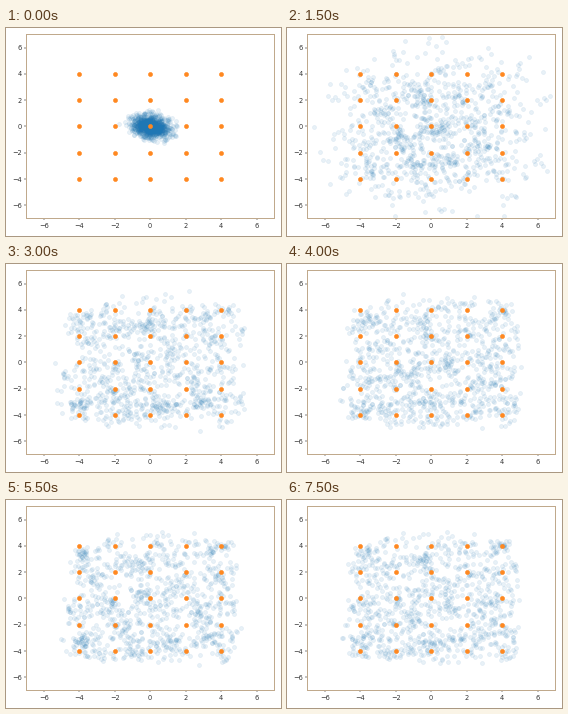
A matplotlib script that plays this animation: 275x208 px, repeating every 8 s.

```python
import numpy as np
import matplotlib.pyplot as plt
from matplotlib.animation import FuncAnimation

W, H, DPI = 275, 208, 43
FRAMES, STEP = 16, 500
N = 1000
LEFT, RIGHT, TOP, BOTTOM = 20, 268.45, 6.45, 190.45

rng = np.random.default_rng(7)
Z = rng.standard_normal((N, 2))
JITTER = rng.standard_normal((N, 2))

# Corners where points pile up late in training: centre, pull
CORNERS = [((-3.8, 3.2), 0.6), ((4.0, 3.9), 0.45), ((-4.2, -4.0), 0.4)]


def samples(k):
    """Generated points at training stage k."""
    if k == 0:
        x = 0.54 * Z[:, 0]
        return np.column_stack([x, 0.05 + 0.42 * Z[:, 1] - 0.2 * x])

    # A wide normal cloud settles into a square
    square = 0.95 * (1 - np.exp(-(k / 4.5) ** 2))
    box = np.array([4.75, 4.6]) * np.tanh(0.85 * Z)
    p = square * box + (1 - square) * 2.8 * Z + 0.18 * JITTER

    # Two horizontal bands come and go around stage 5
    band = 0.45 * np.exp(-((k - 5) / 1.8) ** 2)
    p[:, 1] += band * np.sin(np.pi * p[:, 1] / 3.2)

    # Small folds gather the points in lanes
    x, y = p.T
    p = p + 0.13 * np.column_stack([
        np.sin(2.6 * x + 1.1 * y + 0.9 * k),
        np.sin(2.8 * y - 0.9 * x + 1.3 * k),
    ])

    for centre, pull in CORNERS:
        d = np.array(centre) - p
        near = np.exp(-(d ** 2).sum(axis=1) / 1.2)
        p = p + pull * min(k / 10, 1) * near[:, None] * d
    return p


fig = plt.figure(figsize=(W / DPI, H / DPI), dpi=DPI)
ax = fig.add_axes([LEFT / W, 1 - BOTTOM / H,
                   (RIGHT - LEFT) / W, (BOTTOM - TOP) / H])
ax.set(xlim=(-7, 7), ylim=(-7, 7),
       xticks=range(-6, 7, 2), yticks=range(-6, 7, 2))
ax.tick_params(labelsize=11, labelcolor="#333333")
for spine in ax.spines.values():
    spine.set(color="#c0a98c", linewidth=72 / DPI)

cloud = ax.scatter(*samples(0).T, s=46, color="C0", alpha=0.1)
gx, gy = np.meshgrid(np.arange(-4, 5, 2), np.arange(-4, 5, 2))
ax.scatter(gx, gy, s=46, color="#ff8820", zorder=2)


def update(k):
    cloud.set_offsets(samples(k))
    return (cloud,)


anim = FuncAnimation(fig, update, frames=FRAMES, interval=STEP,
                     repeat=True, repeat_delay=0)
plt.show()
```
